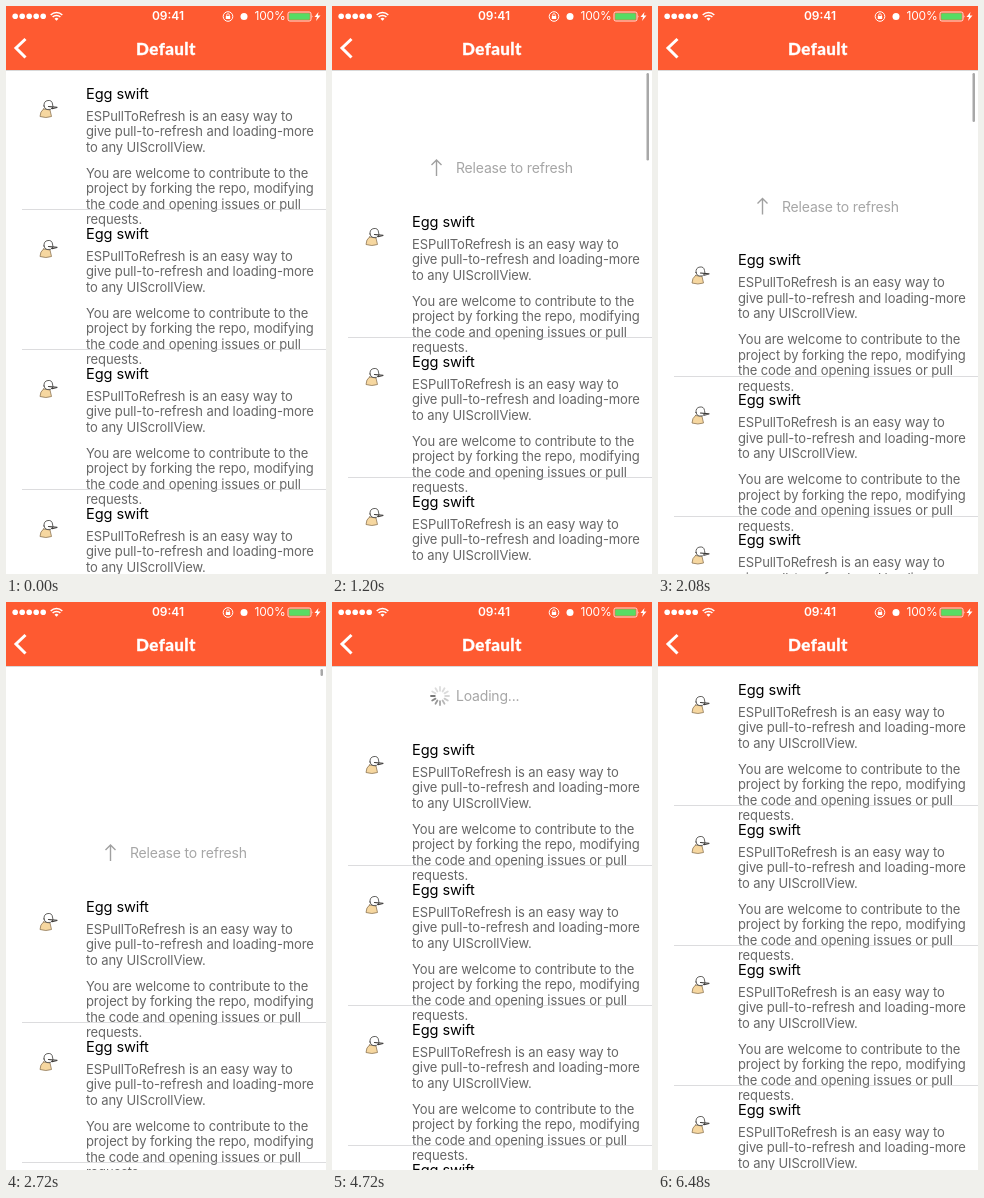
Animation, 320 px wide and 568 px high, one loop 6800 ms. Source, as an HTML page:

```html
<!DOCTYPE html>
<html lang="en">
<head>
<meta charset="utf-8">
<title>Pull to refresh</title>
<style>
  html, body { margin: 0; width: 100%; height: 100%; overflow: hidden; background: #fff; }
  svg { display: block; width: 320px; height: 568px; font-family: Inter, sans-serif; }
  .name { font-size: 14.6px; letter-spacing: -.1px; }
  .body { font-size: 13px; letter-spacing: -.11px; fill: #666; }
  .hint { font-size: 14px; letter-spacing: -.18px; fill: #a6a6a6; }
  .status { font-size: 12px; fill: #fff; }
  .title { font: 800 17px Lato, sans-serif; letter-spacing: .4px; fill: #fff; stroke: #fff; stroke-width: .3; stroke-linejoin: round; }
  .line { fill: none; stroke: #fff; }
</style>
</head>
<body>
<svg viewBox="0 0 320 568">
  <defs>
    <g id="bird" stroke="#3c3a38" stroke-width=".8" stroke-linejoin="round" stroke-linecap="round">
      <path d="M37.500 39 L44 40 L45.500 46.500 Q40 48.500 34 46.500 Q34 41.500 37.500 39Z" fill="#f6d7a0" stroke="#8d7757"/>
      <path d="M38 36 Q37.500 31 42 30.500 Q46 30 46.500 34 L47 37 Q45 40.500 41 39.500 Q38.500 39 38 36Z" fill="#fff"/>
      <path d="M42.500 36.500 L51 37.300 L46 38.600" fill="none" stroke-width="1.200"/>
    </g>
  </defs>
  <g id="list"></g>
  <g id="header">
    <text id="hint" class="hint" x="124" y="39"></text>
    <path id="arrow" d="M0 -8 V8 M-5 3 L0 8 L5 3" fill="none" stroke="#a0a0a0" stroke-width="1.400"/>
    <g id="spinner" transform="translate(108 34)" stroke="#777" stroke-width="1.800" stroke-linecap="round"></g>
  </g>
  <rect id="bar" x="314.500" y="67" width="2.500" rx="1.250" fill="#a8a8a8"/>

  <rect y="64" width="320" height=".5" fill="#b2b2b2"/>
  <rect width="320" height="64" fill="#fe5a31"/>
  <g id="signal" fill="#fff"></g>
  <g class="line" stroke-width="1.500">
    <path d="M44.700 9 a8.200 8.200 0 0 1 11.600 0 M46.600 11 a5.500 5.500 0 0 1 7.800 0"/>
    <path d="M50.500 14.800 l-2 -2 a2.800 2.800 0 0 1 4 0z" fill="#fff" stroke="none"/>
  </g>
  <text class="status" x="162" y="14.400" text-anchor="middle" font-weight="600">09:41</text>
  <circle class="line" cx="222" cy="10.500" r="4.800"/>
  <path d="M219.800 10 h4.400 v3 h-4.400z" fill="#fff"/>
  <path class="line" d="M220.700 10 v-1 a1.300 1.300 0 0 1 2.600 0 v1" stroke-width=".8"/>
  <circle cx="238" cy="10.500" r="3.500" fill="#fff"/>
  <text class="status" x="279.500" y="14.400" text-anchor="end" letter-spacing="-.2">100%</text>
  <rect class="line" x="282" y="6" width="23" height="9" rx="1.800" stroke-width=".8"/>
  <rect x="283.200" y="7.200" width="20.600" height="6.600" rx=".8" fill="#57dc64"/>
  <path d="M305.800 9 q1.400 1.500 0 3z M312.500 6 l-4 5 h2.500 l-1 4 l4.500 -5.500 h-2.700z" fill="#fff"/>
  <path class="line" d="M19.500 33 L10 42 L19.500 51.500" stroke-width="3"/>
  <text class="title" x="160" y="48.700" text-anchor="middle">Default</text>
</svg>
<script>
const $ = id => document.getElementById(id);
const LOOP = 6800, TICK = 80, TRIGGER = 850, RELEASE = 2880, FINISH = 6180;
const clamp = v => Math.max(0, Math.min(1, v));

const paragraphs = [
  [50.7, ['ESPullToRefresh is an easy way to', 'give pull-to-refresh and loading-more', 'to any UIScrollView.']],
  [107.7, ['You are welcome to contribute to the', 'project by forking the repo, modifying', 'the code and opening issues or pull', 'requests.']]
];
const body = paragraphs.map(([top, lines]) => lines.map((line, i) =>
  `<text class="body" x="80" y="${top + i * 15.5}">${line}</text>`).join('')).join('');

$('list').innerHTML = [0, 1, 2, 3].map(i => `<g transform="translate(0 ${64 + i * 140})">
  <use href="#bird"/><text class="name" x="80" y="28.7">Egg swift</text>${body}
  <rect x="16" y="139.5" width="304" height=".5" fill="#b8b8bc"/></g>`).join('');
$('signal').innerHTML = [0, 1, 2, 3, 4].map(i =>
  `<circle cx="${9.2 + i * 7}" cy="10.300" r="2.800"/>`).join('');
$('spinner').innerHTML = Array.from({ length: 12 }, (_, i) =>
  `<path d="M0 -5.200 V-9" transform="rotate(${i * 30})"/>`).join('');
const spokes = [...$('spinner').children];

// time, pull distance
const pull = [
  [640, 0], [720, 14], [800, 48], [880, 80.5], [960, 103], [1120, 124], [1520, 143.5],
  [1840, 151], [1920, 151], [2000, 157], [2080, 166.5], [2400, 196], [2720, 217],
  [RELEASE, 222], [3080, 60], [FINISH, 60], [6400, 4], [6480, 0]
];

function offsetAt(t) {
  const next = pull.findIndex(key => key[0] > t);
  if (next < 1) return 0;
  const [t0, y0] = pull[next - 1], [t1, y1] = pull[next];
  return Math.round((y0 + (y1 - y0) * (t - t0) / (t1 - t0)) * 2) / 2;
}

function draw(now) {
  const t = Math.floor(now % LOOP / TICK) * TICK;
  const offset = offsetAt(t);
  const loading = t >= RELEASE && t < FINISH;
  const move = `translate(0 ${offset})`;
  $('list').setAttribute('transform', move);
  $('header').setAttribute('transform', move);
  $('header').setAttribute('visibility', offset ? 'visible' : 'hidden');

  $('hint').textContent = t < TRIGGER ? 'Pull to refresh' : t < RELEASE ? 'Release to refresh' : 'Loading...';
  const turn = t < RELEASE ? clamp((t - TRIGGER) / 200) : 0;
  const angle = -180 * turn * turn * (3 - 2 * turn);
  $('arrow').setAttribute('transform', `translate(104.5 34) rotate(${angle})`);
  $('arrow').setAttribute('opacity', loading ? 0 : 1);

  $('spinner').setAttribute('opacity', loading ? 1 : 0);
  const head = Math.floor(t / TICK) - 2;
  spokes.forEach((spoke, i) => {
    const age = ((head - i) % 12 + 12) % 12;
    spoke.setAttribute('opacity', Math.max(.25, 1 - age * .12));
  });

  $('bar').setAttribute('height', Math.max(7, 215.5 - offset));
  $('bar').setAttribute('opacity', t < 720 ? 0 : clamp((3280 - t) / 250));
}

function frame() {
  draw(performance.now());
  requestAnimationFrame(frame);
}
frame();
</script>
</body>
</html>
```
